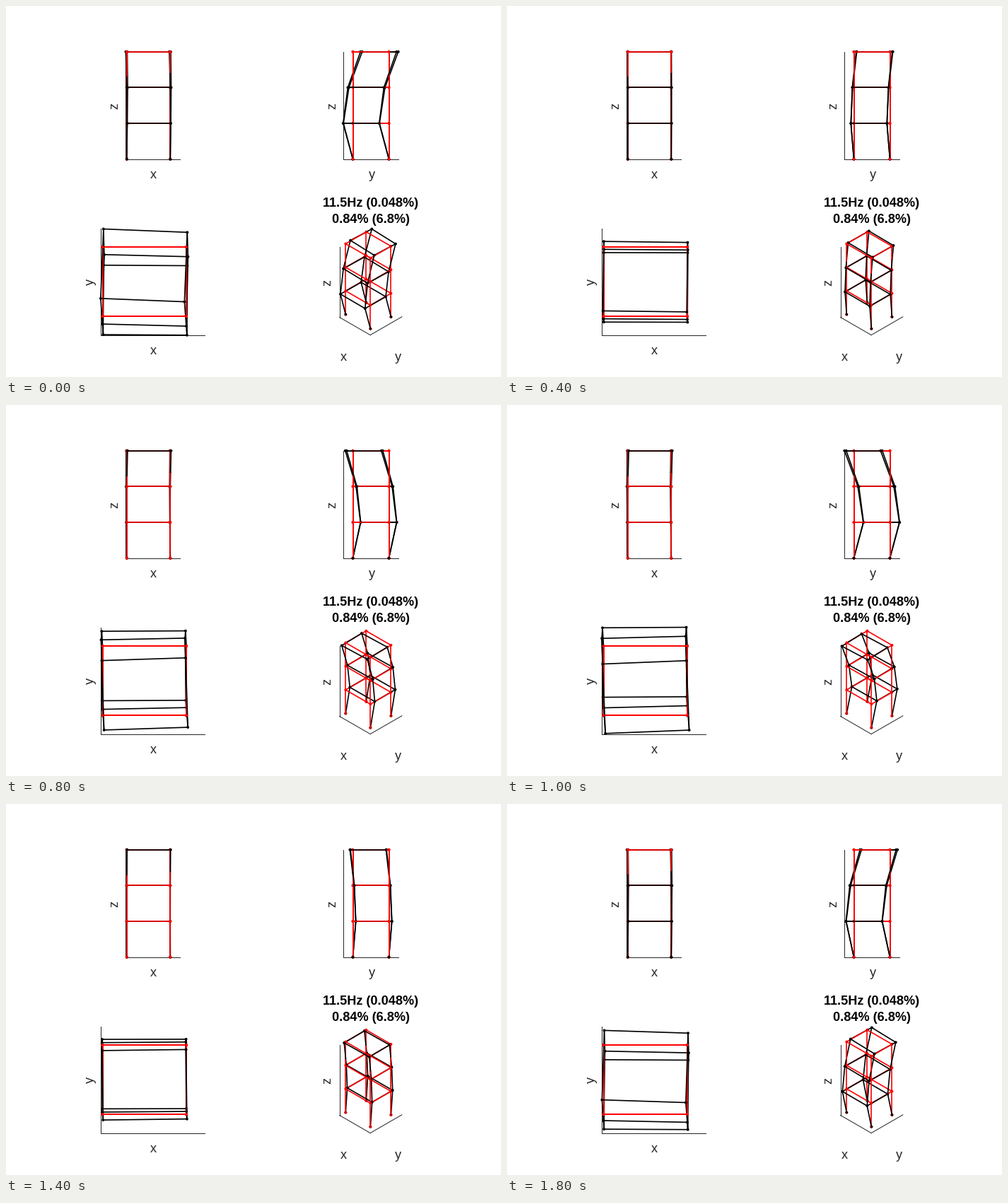
These frames come from a looping animation (700x525 px, 2 s). A matplotlib script:

```python
import itertools

import numpy as np
import matplotlib.pyplot as plt
from matplotlib.animation import FuncAnimation
from matplotlib.collections import LineCollection

W, H, DPI = 700, 525, 100
PX = 72 / DPI  # points per pixel
FRAMES, STEP_MS = 10, 200

LX, LY, LZ = 61.5, 51.0, 152.0
GREY = (0.15, 0.15, 0.15)
RED, BLACK = "#ff0000", "#000000"
LINE_W, DOT_W = 1.67 * PX, 4 * PX

# Mode shape per level: shift in x, shift in y, clockwise twist
MODE = [(0, 0, 0), (0.6, -13.55, 0.006), (0.6, -6.35, 0.025), (-0.35, 12.0, 0.040)]
X_LIM = (-1.37, 74.8)
Y_LIM = (-13.7, LY + 13.7)

CORNERS = [(0, 0), (LX, 0), (LX, LY), (0, LY)]
REST = np.array([(x, y, level * LZ / 3) for level in range(4) for x, y in CORNERS])


def mode_vector():
    shape = np.zeros_like(REST)
    for i, (x, y, _) in enumerate(REST):
        tx, ty, twist = MODE[i // 4]
        shape[i, 0] = tx + twist * (y - LY / 2)
        shape[i, 1] = ty - twist * (x - LX / 2)
    return shape


SHAPE = mode_vector()
COLUMNS = [(i, i + 4) for i in range(12)]
BEAMS = [(4 * k + c, 4 * k + (c + 1) % 4) for k, c in itertools.product((1, 2, 3), range(4))]
MEMBERS = COLUMNS + BEAMS


class View:
    """Orthographic view of the frame; foot sets which feet show on top."""

    def __init__(self, az, el, scale, origin, foot):
        az, el = np.radians([az, el])
        right = np.array([np.cos(az), np.sin(az), 0])
        toward = np.array([np.sin(az) * np.cos(el), -np.cos(az) * np.cos(el), np.sin(el)])
        self.basis = np.array([right, np.cross(toward, right), toward])
        self.scale, self.origin, self.foot = scale, origin, foot
        self.lines = LineCollection([], capstyle="round", zorder=3)

    def project(self, points):
        """Return pixel positions and depth towards the viewer."""
        r, u, d = self.basis @ np.atleast_2d(points).T
        x0, y0 = self.origin
        return np.column_stack([x0 + self.scale * r, y0 - self.scale * u]), d

    def draw_axes(self, ax, y_axis_x):
        (x0, x1), (y0, y1) = X_LIM, Y_LIM
        for ends in ([(x0, y0, 0), (x1, y0, 0)],
                     [(y_axis_x, y0, 0), (y_axis_x, y1, 0)],
                     [(x0, y0, 0), (x0, y0, LZ)]):
            p, _ = self.project(ends)
            if np.ptp(p, axis=0).max() > 1:
                ax.plot(p[:, 0], p[:, 1], color=GREY, lw=PX, zorder=1)

    def update(self, amp):
        moved = REST + amp * SHAPE
        rest_px, rest_d = self.project(REST)
        move_px, move_d = self.project(moved)
        gap = move_d - rest_d
        items = []  # depth, ends, colour, width
        for px, depth, colour, bias in ((rest_px, rest_d, RED, 0),
                                        (move_px, move_d, BLACK, 1e-3)):
            for a, b in MEMBERS:
                cuts = [0, 1]
                # Columns are cut where the two frames pass each other
                if b - a == 4 and gap[a] * gap[b] < -1e-9:
                    cuts.insert(1, gap[a] / (gap[a] - gap[b]))
                for s, t in zip(cuts, cuts[1:]):
                    ends = [px[a] + q * (px[b] - px[a]) for q in (s, t)]
                    mid = depth[a] + (s + t) / 2 * (depth[b] - depth[a])
                    items.append((mid + bias, ends, colour, LINE_W))
            for i, p in enumerate(px):
                lift = 0.05
                if i < 4:
                    lift = 1 + (0.1 * self.foot * np.sign(amp) if colour == BLACK else 0)
                items.append((depth[i] + bias + lift, [p, p + 0.01], colour, DOT_W))
        items.sort(key=lambda item: item[0])
        _, ends, colours, widths = zip(*items)
        self.lines.set_segments(ends)
        self.lines.set_color(colours)
        self.lines.set_linewidth(widths)


plt.rcParams["font.family"] = "Liberation Sans"
fig = plt.figure(figsize=(W / DPI, H / DPI), dpi=DPI, facecolor="white")
ax = fig.add_axes([0, 0, 1, 1])
ax.set_xlim(0, W)
ax.set_ylim(H, 0)
ax.axis("off")

side = View(0, 0, 1, (170.8, 216.7), 1)
front = View(90, 0, 1, (490.5, 216.7), -1)
top = View(0, 90, 1.927, (136.5, 439.3), 1)
iso = View(45, np.degrees(np.arctan(np.sqrt(0.5))), 0.806, (480.3, 436.5), 1)
VIEWS = [side, front, top, iso]

for view in VIEWS:
    view.draw_axes(ax, X_LIM[0] if view is top else X_LIM[1])
    ax.add_collection(view.lines, autolim=False)


def label(x, y, text, turn=0, **style):
    ax.text(x, y, text, ha="center", va="baseline", rotation=turn,
            rotation_mode="anchor", fontsize=18.2 * PX, **style)


for x, y, name in ((208, 244.5, "x"), (517, 244.5, "y"), (208, 493, "x"),
                   (477, 502.5, "x"), (554, 502.5, "y")):
    label(x, y, name, color=GREY)
for x, y, name in ((158.5, 141, "z"), (466, 141, "z"),
                   (124, 390, "y"), (459, 391, "z")):
    label(x, y, name, 90, color=GREY)
label(516, 284, "11.5Hz (0.048%)", weight="bold", color=BLACK)
label(516, 307, "0.84% (6.8%)", weight="bold", color=BLACK)


def update(frame):
    amp = np.cos(2 * np.pi * frame / FRAMES)
    for view in VIEWS:
        view.update(amp)
    return [view.lines for view in VIEWS]


anim = FuncAnimation(fig, update, frames=FRAMES, interval=STEP_MS, repeat=True,
                     repeat_delay=0, blit=False)
plt.show()
```
